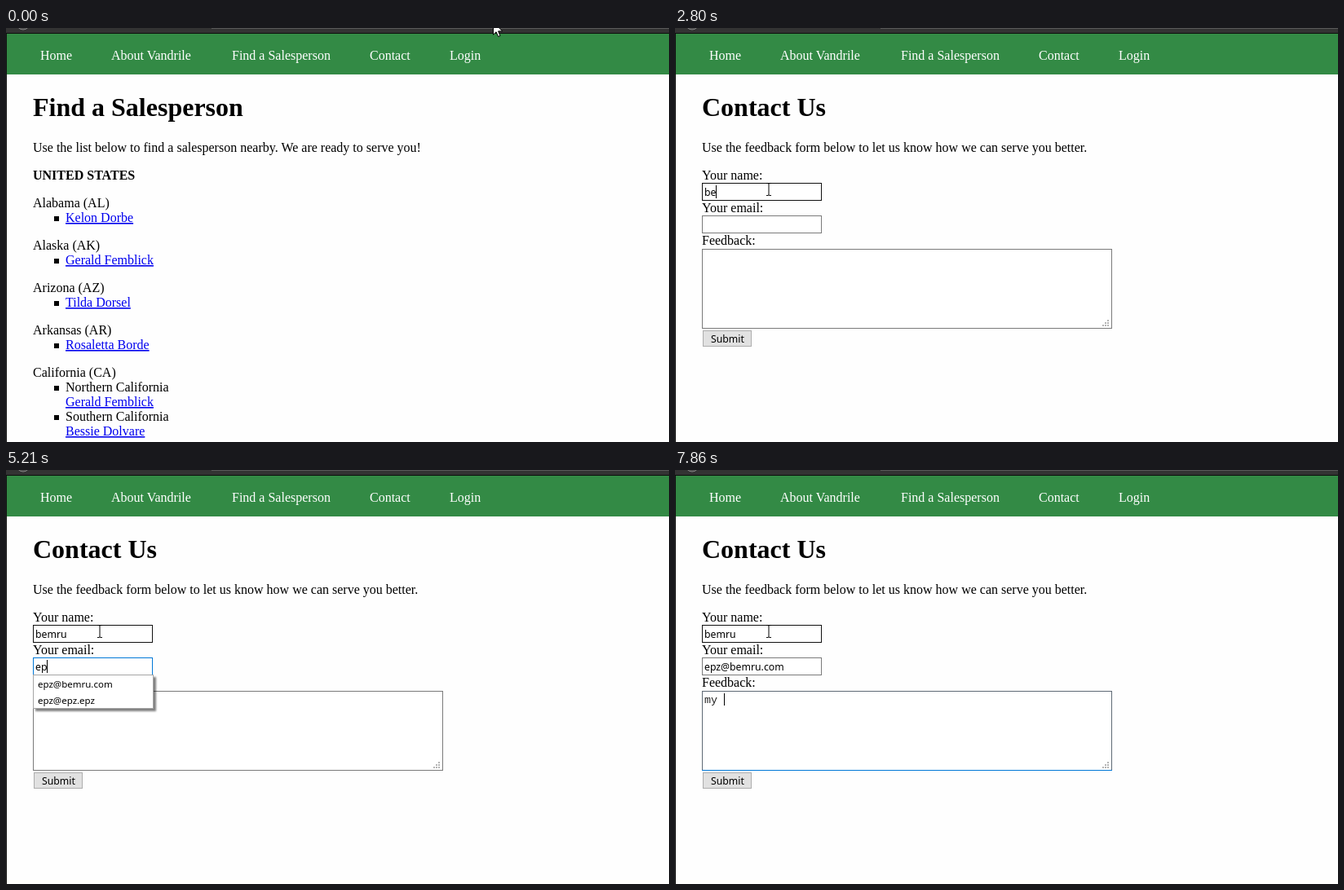
An HTML page for the animation above (7.99 s loop, 813x508 px).

```html
<!DOCTYPE html>
<html lang="en">
<head>
<meta charset="utf-8">
<title>Contact form</title>
<style>
  html, body { margin: 0; width: 100%; height: 100%; overflow: hidden; background: #fefefe; }
  svg { display: block; width: 813px; height: 508px; }
  text { font: 16px "Liberation Serif", "Times New Roman", serif; white-space: pre; }
  rect { shape-rendering: crispEdges; }
  .title { font-size: 32px; font-weight: bold; }
  .bold { font-weight: bold; }
  .nav { fill: #fff; }
  .link { fill: #00e; text-decoration: underline; }
  .ui { font: 12.25px "Noto Sans", "Open Sans", sans-serif; }
  .item { font: 11.5px "Noto Sans", "Open Sans", sans-serif; }
  .mono { font: 13.333px "Liberation Mono", monospace; fill: #222; }
  #menu .box { filter: drop-shadow(3px 3px 1px rgba(0, 0, 0, .5)); }
</style>
</head>
<body>
<svg id="stage" viewBox="0 0 813 508">
  <rect width="813" height="508" fill="#fefefe"/>
  <rect width="813" height="6" fill="#333"/>
  <rect x="252" width="561" height="1" fill="#5a5a5a"/>
  <circle cx="21" cy="-6" r="8" fill="#4a4a4a" stroke="#858585"/>
  <rect y="6" width="813" height="1" fill="#0c0c0c"/>
  <rect y="7" width="813" height="50" fill="#338a45"/>
  <rect y="7" width="1" height="501" fill="#111"/>
  <g id="nav"></g>
  <g id="people"></g>
  <g id="contact"></g>
  <g id="menu"></g>
  <g id="cursor">
    <path id="arrow" d="M.5 .5V16.2L4.1 12.8L6.6 18.5L9 17.5L6.6 11.9H11.6Z" fill="#fff" stroke="#000"/>
    <path id="hand" d="M6.5 14V2.5Q6.5 .6 8 .6T9.5 2.5V8.3Q12 7.2 12.4 9.2Q14.7 8.2 15.1 10.3Q17.4 9.8 17.4 12V16.5Q17.2 19 15.6 20.5V23.4H7.6V21L2 14.6Q.4 12.4 2 11.5Q3.5 11 6.5 14ZM9.5 8V13M12.4 9V13M15.1 10.3V13.4" fill="#fff" stroke="#000"/>
    <path id="beam" d="M0 .5H2.2L3 1.2L3.8 .5H6M3 1V15M0 15.5H2.2L3 14.8L3.8 15.5H6" fill="none" stroke="#000"/>
  </g>
</svg>
<script>
const LOOP = 7990;
const $ = id => document.getElementById(id);

function add(parent, tag, attrs, content = '') {
  const el = document.createElementNS('http://www.w3.org/2000/svg', tag);
  for (const key in attrs) el.setAttribute(key, attrs[key]);
  el.textContent = content;
  parent.append(el);
  return el;
}
const write = (parent, x, y, content, cls = '') => add(parent, 'text', { x, y, class: cls }, content);
const fillRect = (parent, x, y, width, height, fill) => add(parent, 'rect', { x, y, width, height, fill });
const show = (el, on) => { el.style.display = on ? '' : 'none'; };

// A bordered box whose four edges can be recoloured.
function frame(parent, x, y, w, h, fill, color) {
  fillRect(parent, x, y, w, h, fill);
  const edges = [[x, y, w, 1], [x, y, 1, h], [x + w - 1, y, 1, h], [x, y + h - 1, w, 1]]
    .map(edge => fillRect(parent, ...edge, color));
  return (main, bottom = main) =>
    edges.forEach((edge, i) => edge.setAttribute('fill', i < 3 ? main : bottom));
}

// Navigation
[[42, 'Home'], [129, 'About Vandrile'], [277, 'Find a Salesperson'], [446, 'Contact'], [544, 'Login']]
  .forEach(([x, label]) => write($('nav'), x, 39, label, 'nav'));

// Salesperson page
const people = $('people');
write(people, 33, 108, 'Find a Salesperson', 'title');
write(people, 33, 152, 'Use the list below to find a salesperson nearby. We are ready to serve you!');
write(people, 33, 186, 'UNITED STATES', 'bold');
const bullet = y => fillRect(people, 59, y - 7, 6, 6, '#000');
[['Alabama (AL)', 'Kelon Dorbe'], ['Alaska (AK)', 'Gerald Femblick'],
 ['Arizona (AZ)', 'Tilda Dorsel'], ['Arkansas (AR)', 'Rosaletta Borde']].forEach(([state, name], i) => {
  const y = 220 + 52 * i;
  write(people, 33, y, state);
  bullet(y + 18);
  write(people, 73, y + 18, name, 'link');
});
write(people, 33, 428, 'California (CA)');
[['Northern California', 'Gerald Femblick'], ['Southern California', 'Bessie Dolvare']].forEach(([area, name], i) => {
  const y = 446 + 36 * i;
  bullet(y);
  write(people, 73, y, area);
  write(people, 73, y + 18, name, 'link');
});

// Contact page
const contact = $('contact');
const GREY = '#7a7a7a', BLUE = '#0078d7', DARK = '#111';
write(contact, 33, 108, 'Contact Us', 'title');
write(contact, 33, 152, 'Use the feedback form below to let us know how we can serve you better.');
['Your name:', 'Your email:', 'Feedback:'].forEach((label, i) => write(contact, 33, 186 + 40 * i, label));
const nameEdge = frame(contact, 33, 190, 147, 22, '#fff', GREY);
const mailEdge = frame(contact, 33, 230, 147, 22, '#fff', GREY);
const noteEdge = frame(contact, 33, 271, 503, 98, '#fff', GREY);
for (let row = 0; row < 3; row++)
  for (let col = 2 - row; col < 3; col++)
    fillRect(contact, 524 + 3 * col, 358 + 3 * row, 2, 2, '#b4b4b4');
frame(contact, 34, 371, 60, 20, '#e1e1e1', '#adadad');
write(contact, 44, 386, 'Submit', 'ui');
const fields = [write(contact, 36, 206, '', 'ui'), write(contact, 36, 246, '', 'ui'), write(contact, 36, 286, '', 'mono')];
const caret = fillRect(contact, 36, 193, 1, 16, '#000');

// Suggestion list
const menu = $('menu');
function drawMenu(top, items, picked) {
  menu.replaceChildren();
  if (!items.length) return;
  const box = add(menu, 'g', { class: 'box' });
  frame(box, 33, top - 1, 148, 20 * items.length + 2, '#fff', '#a5a5a5');
  items.forEach((label, i) => {
    if (i === picked) fillRect(menu, 34, top + 20 * i, 145, 20, BLUE);
    write(menu, 39, top + 15 + 20 * i, label, 'item').setAttribute('fill', i === picked ? '#fff' : '#000');
  });
}

const NAME = 'bemru', MAIL = 'epz@bemru.com';
const names = [NAME, NAME + ' test'];
const mails = [MAIL, 'epz@epz.epz'];
const allMails = [...mails, 'eku@bemru.com', 'evo@evo.evo', 'ebb@bemru.net', 'ezu@ezu.ezu'];

// Each row: start time, then the value held from then on.
const cursorSteps = [
  [0, 'arrow', 597, -8], [130, 'hand', 500, 14], [260, 'hand', 303, 38], [390, 'hand', 408, 37],
  [520, 'hand', 457, 35], [1330, 'hand', 433, 46], [1480, 'arrow', 290, 112], [1610, 'arrow', 113, 178],
  [1870, 'beam', 118, 186], [2000, 'beam', 112, 190]
];
const nameSteps = [[0, 0], [2670, 1], [2800, 2], [2930, 3], [3060, 4], [3190, 5]];
const mailSteps = [[0, 0], [4950, 1], [5210, 2], [5340, 3], [6130, MAIL.length]];
const noteSteps = [[0, 0], [7470, 1], [7600, 2], [7860, 3]];
const focusSteps = [[0, -1], [2130, 0], [3460, 1], [6530, 2]];
const caretSteps = [[0, 0], [2130, 1], [4000, 0], [4530, 1], [5600, 0], [6130, 1], [7070, 0], [7470, 1]];
const menuSteps = [
  [0, 0, [], -1], [2930, 212, names, -1], [3460, 0, [], -1], [5080, 252, allMails, -1],
  [5210, 252, mails, -1], [5860, 252, mails, 0], [6130, 0, [], -1]
];
const at = (steps, t) => steps.findLast(step => step[0] <= t);

let lastMenu;
function render(t) {
  const onContact = t >= 1060;
  show(people, !onContact);
  show(contact, onContact);

  const [, shape, x, y] = at(cursorSteps, t);
  ['arrow', 'hand', 'beam'].forEach(id => show($(id), id === shape));
  $('cursor').setAttribute('transform', `translate(${x} ${y})`);

  const typed = [
    NAME.slice(0, at(nameSteps, t)[1]),
    MAIL.slice(0, at(mailSteps, t)[1]),
    'my '.slice(0, at(noteSteps, t)[1])
  ];
  fields.forEach((field, i) => { field.textContent = typed[i]; });

  const focus = at(focusSteps, t)[1];
  nameEdge(t >= 1870 ? DARK : GREY);
  mailEdge(focus === 1 ? BLUE : GREY);
  noteEdge(focus === 2 ? '#5f6a75' : GREY, focus === 2 ? BLUE : GREY);

  show(caret, focus >= 0 && at(caretSteps, t)[1]);
  if (onContact && focus >= 0) {
    const width = focus === 2 ? 8 * typed[2].length : fields[focus].getComputedTextLength();
    caret.setAttribute('x', 36 + Math.floor(width));
    caret.setAttribute('y', focus === 2 ? 274 : 193 + 40 * focus);
    caret.setAttribute('height', focus === 2 ? 15 : 16);
  }

  const step = at(menuSteps, t);
  if (step !== lastMenu) drawMenu(...step.slice(1));
  lastMenu = step;
}

const start = performance.now();
function tick() {
  render((performance.now() - start) % LOOP);
  requestAnimationFrame(tick);
}
tick();
</script>
</body>
</html>
```
